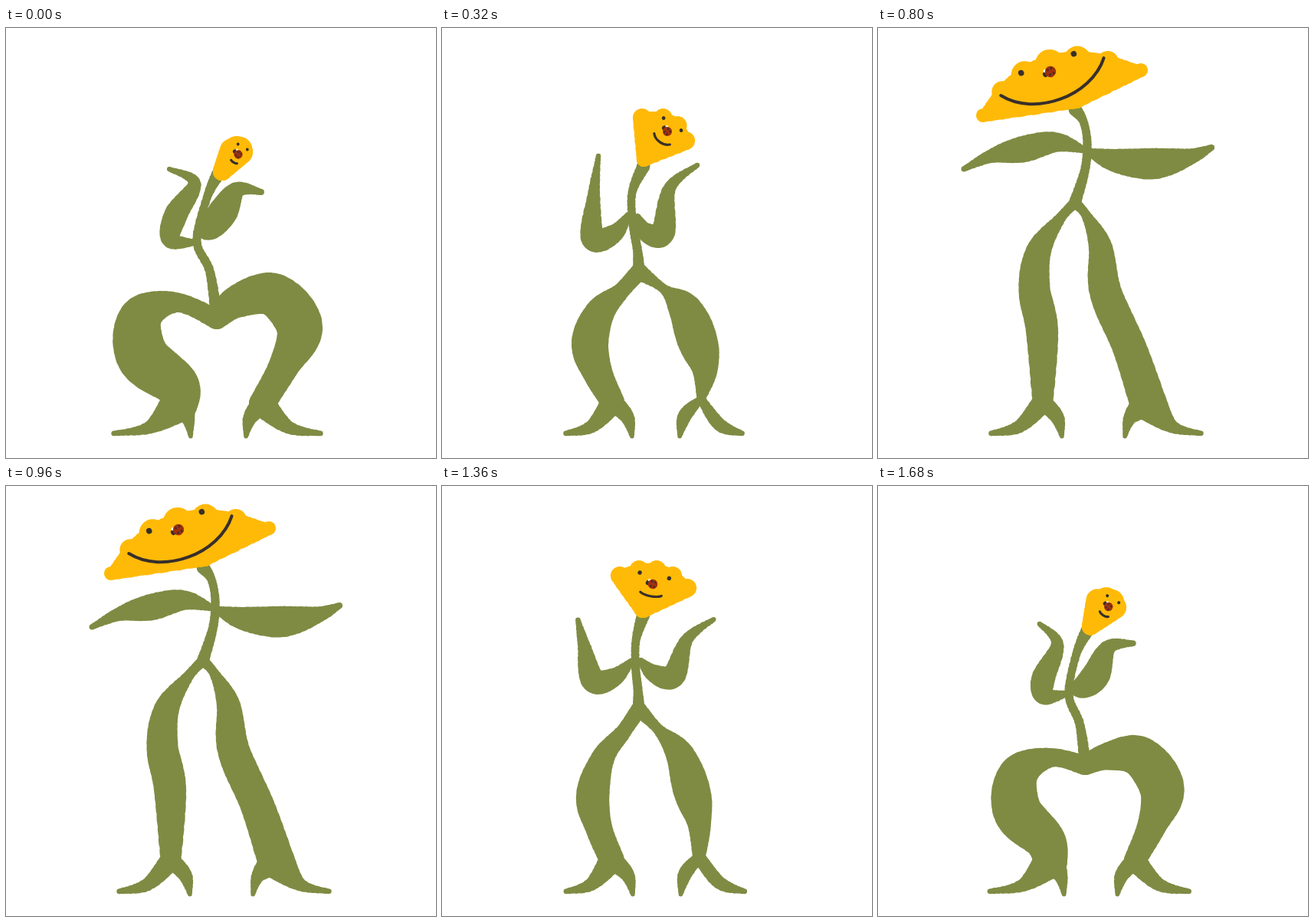
Recreate the animation shown at these times as an HTML page with a canvas. Size 561 by 561 pixels, loop 1.76 s.

```html
<!DOCTYPE html>
<html lang="en">
<head>
<meta charset="utf-8">
<title>Blooming dancer</title>
<style>
  html, body { margin: 0; width: 100%; height: 100%; overflow: hidden; background: #fff; }
  canvas { display: block; width: 100vw; height: 100vh; }
</style>
</head>
<body>
<canvas id="stage" width="561" height="561"></canvas>
<script>
const GREEN = '#7f8b43', YELLOW = '#ffba08', INK = '#382f2b', RED = '#a0300f';
const STEP = 80, PEAK = 11, TAU = 2 * Math.PI;
const FLOOR = 532;
const ctx = document.getElementById('stage').getContext('2d');

// Key poses by step, from crouching to full bloom; the way back mirrors them.
const dancer = {
  // x y from sepal to pelvis
  stem: {
    0: '277 190  262 222  249 278  266 318  275 380',
    4: '263 180  248 215  249 255  255 290  257 318',
    7: '262 144  263 175  260 200  257 220  256 238',
    10: '257 106  268 122  273 150  270 185  257 228'
  },
  // x y width from hip to ankle
  legL: {
    0: '222 358 26  176 377 54  178 428 68  222 465 58  226 490 48',
    4: '233 344 22  206 371 38  193 412 48  204 452 38  223 488 30',
    7: '244 274 17  219 320 13  204 388 34  207 438 28  219 487 36',
    10: '238 248 14  210 290 32  204 340 41  214 395 42  215 488 27'
  },
  legR: {
    0: '301 357 42  349 348 56  383 390 60  363 440 40  334 490 34',
    4: '290 341 13  317 367 42  333 407 52  343 445 33  338 484 11',
    7: '268 272 18  296 315 24  312 380 40  321 432 25  330 485 28',
    10: '272 245 13  290 285 30  297 345 42  328 417 44  352 488 48'
  },
  // x of toe and heel, left then right
  feet: {
    0: '140 241  411 313',
    4: '161 248  392 310',
    7: '162 251  402 314',
    10: '147 240  422 322'
  },
  // bulk, then x y from shoulder to tip
  armL: {
    0: '30  247 280  215 276  222 243  246 202  213 184',
    4: '31  243 244  225 268  197 274  198 218  204 167',
    7: '32  255 198  225 212  198 212  160 189  124 190',
    10: '34  269 159  232 149  190 158  148 167  112 184'
  },
  armR: {
    0: '38  251 265  266 262  283 240  302 211  333 214',
    4: '31  255 246  266 266  288 267  297 209  333 179',
    7: '29  267 191  298 202  330 208  365 183  397 164',
    10: '40  276 162  310 173  360 177  407 168  435 156'
  },
  // base x y width, first, middle and last petal x y, petal radius, extra in the middle, petal count
  head: {
    0: '282 187 24  295 160  303 158  306 162  16 1 4',
    4: '263 172 18  261 117  299 121  318 147  12 0 4',
    5: '262 161 22  232 117  280 109  320 133  12 0 5',
    7: '263 132 21  208 110  265 77  324 91  13 2 5',
    10: '258 93 24  137 114  224 47  343 55  9 10 7'
  },
  // x y tilt, eye gap, mouth drop, mouth width, sag
  face: {
    0: '303 165 30  14  11  9 1',
    4: '294 135 35  28  12  25 5',
    5: '275 128 11  39  13  28 3',
    7: '267 95 -8  52  6  62 9',
    10: '225 57 -20  73  7  143 31'
  }
};

for (const part of Object.values(dancer))
  for (const at in part) part[at] = part[at].split(/ +/).map(Number);

const mix = (a, b, t) => a + (b - a) * t;
const noise = i => (Math.sin(i * 127.1) * 43758.5) % 1;
const group = (nums, n) => Array.from({ length: nums.length / n }, (_, i) => nums.slice(i * n, i * n + n));

function part(name, k) {
  const keys = dancer[name], times = Object.keys(keys).map(Number);
  let i = 0;
  while (i < times.length - 2 && times[i + 1] <= k) i++;
  const t = (k - times[i]) / (times[i + 1] - times[i]);
  const to = keys[times[i + 1]];
  return keys[times[i]].map((v, j) => mix(v, to[j], Math.min(t, 1.1)));
}

function spline(a, b, c, d, t) {
  return b + t / 2 * (c - a + t * (2 * a - 5 * b + 4 * c - d + t * (3 * (b - c) + d - a)));
}

// Tapered stroke with a slightly rough edge through [x, y, width] joints.
function limb(joints, color) {
  const last = joints.length - 1, dots = 32;
  const at = i => joints[Math.max(0, Math.min(last, i))];
  ctx.fillStyle = color;
  ctx.beginPath();
  for (let n = 0; n <= last * dots; n++) {
    const i = Math.floor(n / dots), t = n / dots - i;
    const [x, y, w] = [0, 1, 2].map(c => spline(at(i - 1)[c], at(i)[c], at(i + 1)[c], at(i + 2)[c], t));
    const r = Math.max(1.5, w / 2 + noise(n) * .4);
    ctx.moveTo(x + r, y);
    ctx.arc(x, y, r, 0, TAU);
  }
  ctx.fill();
}

function dot(x, y, r, color) {
  ctx.fillStyle = color;
  ctx.beginPath();
  ctx.arc(x, y, r, 0, TAU);
  ctx.fill();
}

function leg(pelvis, nums, toe, heel) {
  const joints = group(nums, 3), [x, y, w] = joints[joints.length - 1];
  limb([pelvis, ...joints], GREEN);
  limb([[x, y, w], [mix(x, toe, .45), mix(y, FLOOR, .45) + 12, 17], [toe, FLOOR - 3, 6]], GREEN);
  limb([[x, y, w * .8], [mix(x, heel, .75), mix(y, FLOOR, .45), 18], [heel, FLOOR + 1, 5]], GREEN);
}

function arm([bulk, ...nums]) {
  const taper = [.25, .75, 1, .53, .2];
  limb(group(nums, 2).map(([x, y], i) => [x, y, bulk * taper[i]]), GREEN);
}

// Petals fan out from the base to an arc of round tips.
function head([bx, by, bw, x0, y0, xm, ym, x1, y1, r, swell, count]) {
  const n = Math.round(count) - 1;
  const arc = (a, m, b, t) => a * (1 - t) * (1 - 2 * t) + m * 4 * t * (1 - t) + b * t * (2 * t - 1);
  const tips = Array.from({ length: n + 1 }, (_, i) => {
    const t = i / n;
    return [arc(x0, xm, x1, t), arc(y0, ym, y1, t), 2 * (r + swell * Math.sin(Math.PI * t))];
  });
  for (const tip of tips) limb([[bx, by, bw], tip], YELLOW);
  limb(tips.map(([x, y, w]) => [x, y, w * .6]), YELLOW);
  ctx.beginPath();
  ctx.moveTo(bx, by);
  for (const [x, y] of tips) ctx.lineTo(x, y);
  ctx.fill();
}

function ladybug(r, turn) {
  ctx.save();
  ctx.rotate(turn);
  ctx.scale(r, r);
  dot(1, 0, .5, INK);
  dot(.85, .6, .28, '#fff');
  dot(0, 0, 1, RED);
  ctx.fillRect(-.9, -.08, 1.7, .16);
  for (const x of [-.4, .3])
    for (const y of [-.48, .48]) dot(x, y, .2, INK);
  ctx.restore();
}

function face([x, y, tilt, gap, drop, smile, sag]) {
  const angle = tilt * Math.PI / 180, half = smile / 2, low = drop + sag * 4 / 3;
  ctx.save();
  ctx.translate(x, y);
  ctx.rotate(angle);
  for (const side of [-1, 1]) dot(side * gap / 2, -11.5, 1.5 + gap / 32, INK);
  ctx.strokeStyle = INK;
  ctx.lineCap = 'round';
  ctx.lineWidth = 3 + smile / 140;
  ctx.beginPath();
  ctx.moveTo(-half, drop);
  ctx.bezierCurveTo(-half * .55, low, half * .55, low, half, drop);
  ctx.stroke();
  ladybug(5.3 + gap / 38, Math.PI + angle * .4);
  ctx.restore();
}

function draw(k) {
  ctx.fillStyle = '#fff';
  ctx.fillRect(0, 0, 561, 561);
  const get = name => part(name, k);
  const stemWidths = [17, 11, 11, 12, 16];
  const stem = group(get('stem'), 2).map(([x, y], i) => [x, y, stemWidths[i]]);
  const legL = get('legL'), [toeL, heelL, toeR, heelR] = get('feet');
  const pelvis = [stem[4][0], stem[4][1], legL[2]];
  leg(pelvis, legL, toeL, heelL);
  leg(pelvis, get('legR'), toeR, heelR);
  limb(stem, GREEN);
  arm(get('armL'));
  arm(get('armR'));
  head(get('head'));
  face(get('face'));
}

let shown = -1;
function tick() {
  const step = Math.floor(performance.now() / STEP) % (2 * PEAK);
  if (step !== shown) draw(PEAK - Math.abs(PEAK - step));
  shown = step;
  requestAnimationFrame(tick);
}
tick();
</script>
</body>
</html>
```
